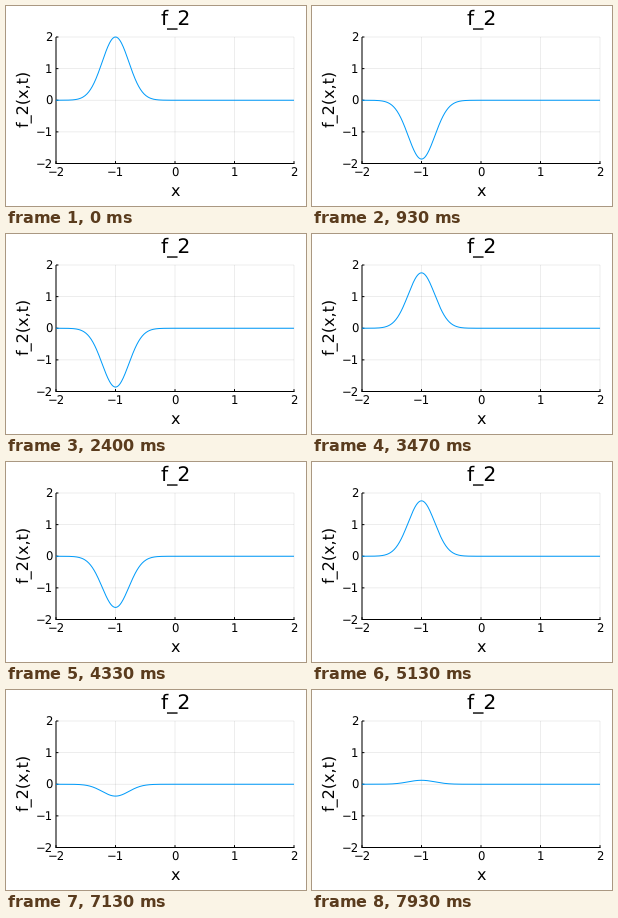
Animation, 300 px wide and 200 px high, one loop 8000 ms. Source, as a matplotlib script:

```python
import numpy as np
import matplotlib.pyplot as plt
from matplotlib.animation import FuncAnimation

W, H, DPI = 300, 200, 100
LOOP_MS, STEP_MS = 8000, 20
POSES, PERIOD = 120, 25
LEFT, RIGHT, TOP, BOTTOM = 50, 288, 31, 157.5
MID = (TOP + BOTTOM) / 2
PX = 72 / DPI
TICK = 2.4
TEXT_SCALE = 1.05

plt.rcParams.update({"font.family": "DejaVu Sans", "text.hinting": "none"})
fig = plt.figure(figsize=(W / DPI, H / DPI), dpi=DPI, facecolor="white")

# One axes over the stage, measured in pixels from the top left
ax = fig.add_axes([0, 0, 1, 1])
ax.set(xlim=(0, W), ylim=(H, 0))
ax.axis("off")


def px(x):
    return LEFT + (x + 2) * (RIGHT - LEFT) / 4


def py(y):
    return MID - y * (BOTTOM - TOP) / 4


def line(xs, ys, **kw):
    style = dict(color="black", linewidth=PX, snap=False, solid_capstyle="butt")
    return ax.plot(xs, ys, **{**style, **kw})[0]


def put(x, y, text, size, ha="center", rotation=0):
    ax.text(x, y, text, fontsize=size * TEXT_SCALE, ha=ha, va="baseline",
            rotation=rotation, rotation_mode="anchor")


grid = dict(alpha=0.1, linewidth=0.5)
for v in range(-2, 3):
    x, y = px(v), py(v)
    name = str(v).replace("-", "\u2212")
    line([x, x], [TOP, BOTTOM], **grid)
    line([LEFT, RIGHT], [y, y], **grid)
    line([x, x], [BOTTOM, BOTTOM - TICK])
    line([LEFT, LEFT + TICK], [y, y])
    put(x, 170.5, name, 8)
    put(46.5, y + 4.2, name, 8, ha="right")
line([LEFT, LEFT], [TOP, BOTTOM])
line([LEFT, RIGHT], [BOTTOM, BOTTOM], solid_capstyle="projecting")

put(170, 18, "f_2", 14)
put(169, 190, "x", 11)
put(22, MID - 1.5, "f_2(x,t)", 11, rotation=90)

xs = np.linspace(-2, 2, 401)
bump = 2 * np.exp(-10 * (xs + 1) ** 2)
curve = line(px(xs), py(bump), color=(0, 0.606, 0.979), zorder=3)


def draw(i):
    pose = (i * STEP_MS + 15) * POSES // LOOP_MS
    curve.set_ydata(py(bump * np.cos(2 * np.pi * pose / PERIOD)))
    return curve,


anim = FuncAnimation(fig, draw, frames=LOOP_MS // STEP_MS, interval=STEP_MS,
                     repeat=True, repeat_delay=0)
plt.show()
```
